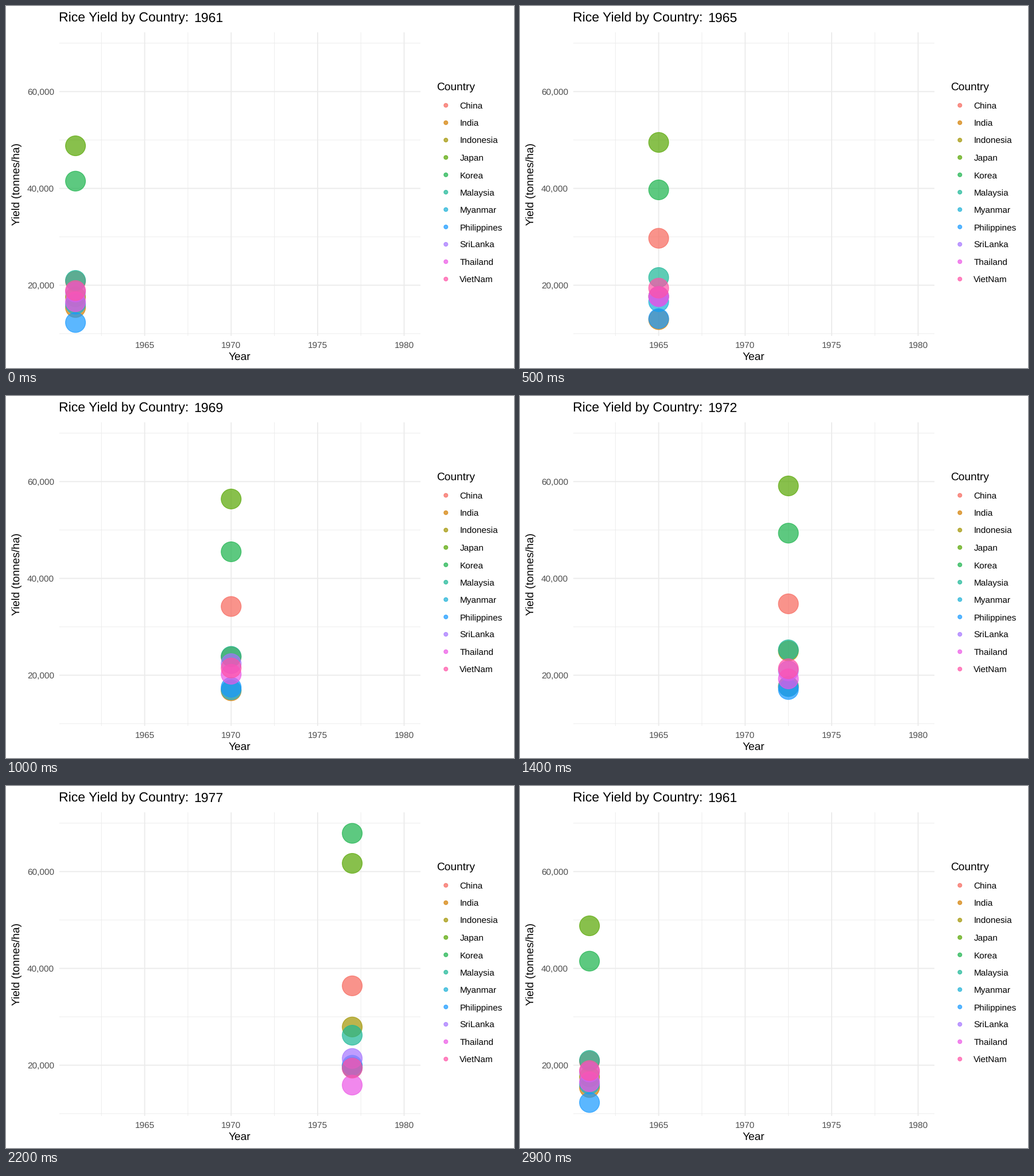
Write a matplotlib script that moves like this. It is 885 px wide and 632 px high and loops after 3 s.

```python
import matplotlib.pyplot as plt
import numpy as np
from matplotlib.animation import FuncAnimation
from matplotlib.patches import Circle

W, H, DPI = 885, 632, 100
PX = 72 / DPI  # points per pixel
FIRST, LAST = 1961, 1980
SPAN = LAST - FIRST + 1  # transitions in a loop, the last one back to the start

plt.rcParams.update({"font.family": "Liberation Sans", "text.hinting": "none"})

# Yields in hundreds at a few key years, linear in between.
KEY_YEARS = [FIRST, 1965, 1970, 1975, 1977, LAST]
YIELDS = {
    "China": [208, 297, 342, 353, 364, 414],
    "India": [154, 129, 168, 186, 196, 200],
    "Indonesia": [176, 177, 238, 262, 279, 329],
    "Japan": [488, 495, 564, 618, 617, 513],
    "Korea": [415, 397, 455, 532, 679, 429],
    "Malaysia": [210, 216, 239, 266, 262, 285],
    "Myanmar": [161, 166, 170, 183, 195, 277],
    "Philippines": [123, 131, 175, 166, 200, 221],
    "SriLanka": [186, 176, 224, 194, 214, 252],
    "Thailand": [166, 177, 202, 183, 159, 189],
    "VietNam": [189, 194, 215, 212, 194, 208],
}

# Transitions that pass through a halfway pose; the others jump at once.
TWO_STEP = {4, 10, 12, 15, 17, *range(14, SPAN + 1, 2)}


def schedule():
    """List of (years since the start, year in the title), one per frame."""
    steps = [(0, FIRST)]
    for n in range(1, SPAN + 1):
        before = FIRST + n - 1
        if n in TWO_STEP:
            steps += [(n - 0.5, before), (n, FIRST + n % SPAN)]
        else:
            steps.append((n, before))
    return steps


def looped(t, values):
    """Value after t years, returning to the first one at the end."""
    return np.interp(FIRST + t, KEY_YEARS + [LAST + 1], values + values[:1])


def hue_color(i, n):
    """Colour i of n, evenly spaced by hue at constant lightness and chroma."""
    light, chroma = 65, 100
    hue = np.radians(15 + 360 * i / n)
    u = chroma * np.cos(hue) / (13 * light) + 0.1978
    v = chroma * np.sin(hue) / (13 * light) + 0.4683
    y = ((light + 16) / 116) ** 3
    xyz = y * np.array([9 * u / (4 * v), 1, (12 - 3 * u - 20 * v) / (4 * v)])
    to_rgb = [[3.2406, -1.5372, -0.4986],
              [-0.9689, 1.8758, 0.0415],
              [0.0557, -0.2040, 1.0570]]
    r, g, b = np.clip(np.dot(to_rgb, xyz), 0, 1)
    # Screen profile with gamma 1.8 and a slightly different green.
    return np.clip([r + 0.03 * g, 1.04 * g, b], 0, 1) ** (1 / 1.8)


def to_x(year):
    return 241.6 + (year - 1965) * 30.13


def to_y(amount):
    return 487.5 - (amount - 20000) * 169.05 / 20000


fig = plt.figure(figsize=(W / DPI, H / DPI), dpi=DPI, facecolor="white")
ax = fig.add_axes([0, 0, 1, 1])
ax.set_xlim(0, W)
ax.set_ylim(H, 0)
ax.axis("off")


def label(x, y, text, size, color="black", **kw):
    return ax.text(x, y, text, fontsize=size * PX, color=color,
                   va="baseline", rotation_mode="anchor", **kw)


def grid_line(xs, ys, major):
    ax.plot(xs, ys, color="#EBEBEB", lw=(1.86 if major else 0.93) * PX,
            solid_capstyle="butt", snap=False, zorder=1)


def dot(x, y, radius, color):
    return ax.add_patch(Circle((x, y), radius, facecolor=color, edgecolor=color,
                               alpha=0.7, lw=1.24 * PX, zorder=3))


LEFT, RIGHT, TOP, BOTTOM = 92.8, 722, 46, 576
SMALL, MEDIUM, LARGE = 15.36, 19.2, 23.04
GREY = "#4D4D4D"

for amount in range(10000, 70001, 10000):
    major = amount % 20000 == 0
    y = to_y(amount)
    grid_line([LEFT, RIGHT], [y, y], major)
    if major:
        label(84, y + 5.6, f"{amount:,}", SMALL, GREY, ha="right")

for year in np.arange(1962.5, LAST + 1, 2.5):
    major = year % 5 == 0
    x = to_x(year)
    grid_line([x, x], [TOP, BOTTOM], major)
    if major:
        label(x, 596.8, f"{year:.0f}", SMALL, GREY, ha="center")

label(92.2, 27.6, "Rice Yield by Country:", LARGE)
title_year = label(326.9, 27.6, "", LARGE)
label(407.4, 618.2, "Year", MEDIUM, ha="center")
label(23.7, 311, "Yield (tonnes/ha)", MEDIUM, ha="center", rotation=90)

label(750.4, 147, "Country", MEDIUM)
bubbles = []
for i, name in enumerate(YIELDS):
    color = hue_color(i, len(YIELDS))
    y = 173.4 + 30.33 * i
    dot(766.3, y, 3.41, color)
    label(790.3, y + 6, name, SMALL)
    bubbles.append(dot(0, 0, 17.4, color))

STEPS = schedule()


def draw(frame):
    t, year = STEPS[frame]
    x = to_x(looped(t, KEY_YEARS))
    for bubble, yields in zip(bubbles, YIELDS.values()):
        bubble.center = x, to_y(100 * looped(t, yields))
    title_year.set_text(str(year))
    return bubbles + [title_year]


anim = FuncAnimation(fig, draw, frames=len(STEPS), interval=100,
                     repeat=True, repeat_delay=0, blit=False)
plt.show()
```
